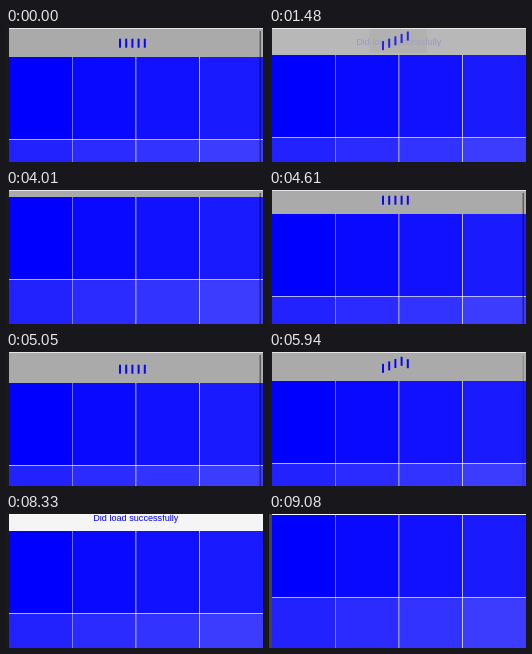
An HTML page with a canvas for the animation above (9180 ms loop, 257 px wide and 134 px high).

```html
<!DOCTYPE html>
<html lang="en">
<head>
<meta charset="utf-8">
<title>Pull to refresh</title>
<style>
  html, body { margin: 0; width: 100%; height: 100%; overflow: hidden; background: #fff; }
  canvas { display: block; width: 257px; height: 134px; }
</style>
</head>
<body>
<canvas id="stage" width="257" height="134"></canvas>
<script>
const ctx = document.getElementById('stage').getContext('2d');
const W = 257, H = 134, LOOP = 9180, TICK = 148.7;
const LEFT = 3, COLUMN = 63.45, ROW = 83;
const CLOSED = 1, PULLED = 31;

// Times in ms; rest is the header height while loading.
const cycles = [
  { pull: -994, release: 450, done: 1440, close: 3025, rest: 27, tint: '#f5f5f5' },
  { pull: 3860, release: 5480, done: 6800, close: 8235, rest: 29, tint: '#d5d5fb' }
];

const clamp = x => Math.min(1, Math.max(0, x));
const progress = (time, start, duration) => clamp((time - start) / duration);
const easeOut = (x, power) => 1 - (1 - x) ** power;
const mix = (a, b, x) => a + (b - a) * x;

function rect(color, x, y, w, h, alpha = 1) {
  ctx.globalAlpha = alpha;
  ctx.fillStyle = color;
  ctx.fillRect(x, y, w, h);
  ctx.globalAlpha = 1;
}

function headerBottom(time, { pull, release, close, rest }) {
  if (time >= close) return mix(rest, CLOSED, easeOut(progress(time, close, 400), 2));
  if (time >= release) return mix(PULLED, rest, easeOut(progress(time, release, 400), 2));
  return mix(CLOSED, PULLED, easeOut(progress(time, pull, 1190), 1.5));
}

// Triangle wave that rises from zero, with a period of ten units.
function triangle(x) {
  return x <= 0 ? 0 : 1 - Math.abs((x + 2.5) % 10 - 5) / 2.5;
}

function drawGrid(top) {
  for (let i = 0; i < 8; i++) {
    const shade = Math.round(i * 8.5);
    const row = Math.floor(i / 4), col = i % 4;
    const x = Math.round(LEFT + col * COLUMN);
    rect(`rgb(${shade},${shade},255)`, x, top + row * ROW, W - x, ROW);
  }
  for (let i = 1; i < 4; i++) {
    const width = i === 1 ? 0.4 : 0.7;
    rect('#fff', LEFT + i * COLUMN - width / 2, top, width, H);
  }
  rect('#fff', LEFT, top + ROW - 1, W - LEFT, 1, 0.7);
}

function drawHeader(bottom, time, cycle) {
  const success = progress(time, cycle.done, 300);
  const loading = 1 - success;
  rect('#aaa', LEFT, 0, W - LEFT, bottom);
  rect(time < cycle.close ? cycle.tint : '#f5f5f5', LEFT, 0, W - LEFT, bottom, success);

  ctx.globalAlpha = success;
  ctx.fillStyle = '#00f';
  ctx.font = '9.15px "Liberation Sans", Arial, sans-serif';
  ctx.textAlign = 'center';
  ctx.fillText('Did load successfully', 129.8, bottom - 10.3);

  rect('#aaa', 100, 0, 58, bottom - 2, loading * 0.6);
  for (let i = 0; i < 5; i++) {
    const lift = 6 * triangle((time - cycle.release - 200) / 50 - i);
    rect('#0808f0', 113 + i * 6.2, bottom - 18.3 - lift, 2, 9, loading);
  }
}

function draw(now) {
  const time = Math.floor((now % LOOP + 10) / TICK) * TICK + 5;
  const cycle = cycles[time < 3900 ? 0 : 1];
  const bottom = Math.round(headerBottom(time, cycle));
  const scrollbar = progress(time, cycle.pull, 150) * (1 - progress(time, cycle.release, 700));

  rect('#fff', 0, 0, W, H);
  drawHeader(bottom, time, cycle);
  drawGrid(bottom);
  rect('#000', 253.5, 3, 1.5, H - 3, 0.45 * scrollbar);
  rect('#fff', LEFT, 0, W - LEFT, 1, 0.7);
  rect(time > 9070 ? '#444' : '#1a1a1a', 0, 0, LEFT, H);
}

const start = performance.now();
function loop() {
  draw(performance.now() - start);
  requestAnimationFrame(loop);
}
loop();
</script>
</body>
</html>
```
